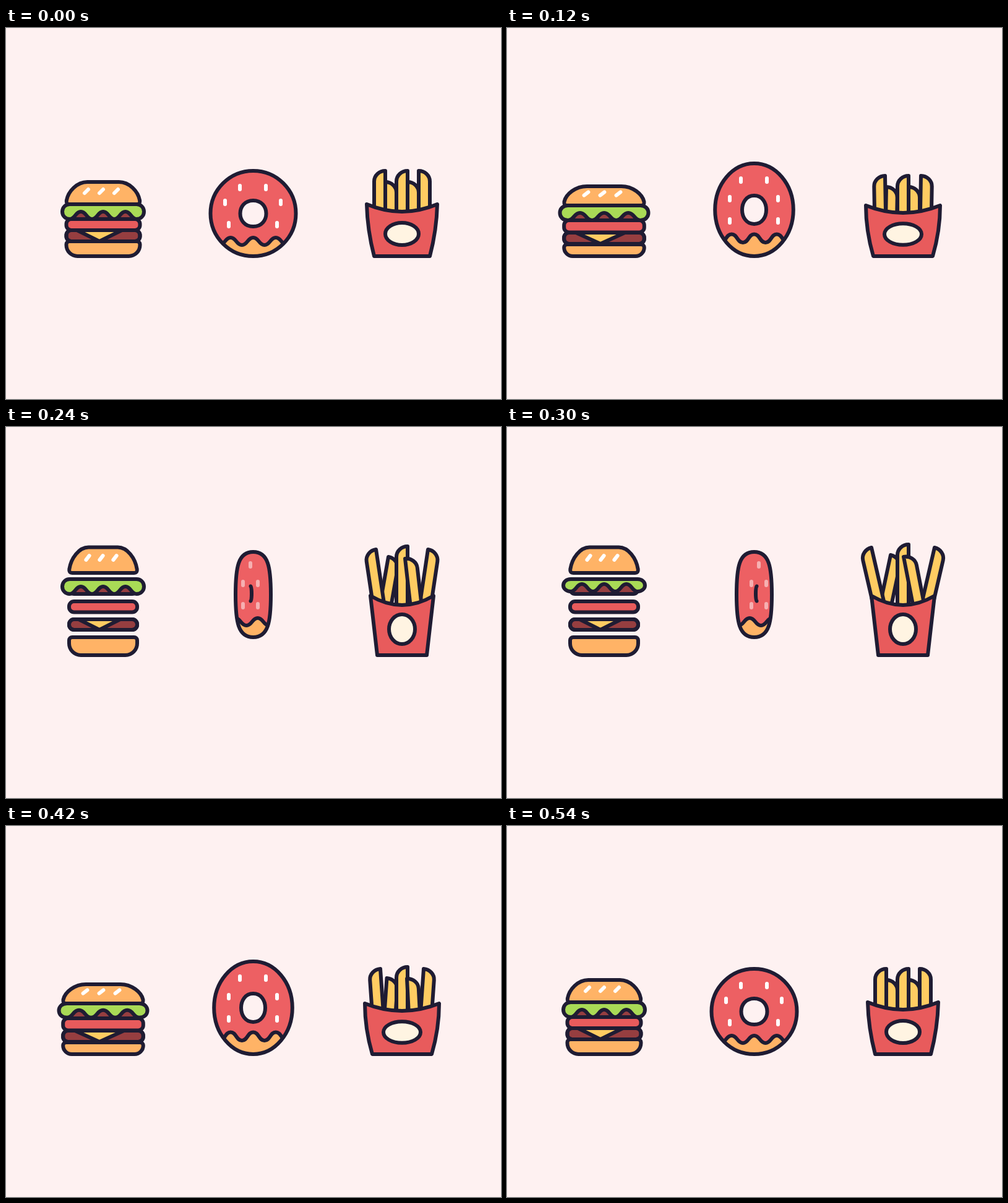
An HTML page with a canvas that plays this animation: 800 px wide and 600 px high, repeating every 720 ms.

```html
<!DOCTYPE html>
<html lang="en">
<head>
<meta charset="utf-8">
<title>Jumping snacks</title>
<style>
html, body { margin: 0; width: 100%; height: 100%; overflow: hidden; background: #fef1f1; }
canvas { display: block; }
</style>
</head>
<body>
<canvas id="stage" width="800" height="600"></canvas>
<script>
const ctx = document.getElementById('stage').getContext('2d');
const INK = '#1f1c33', BG = '#fef1f1', BUN = '#ffb366', GLAZE = '#ed6063', RED = '#e85b5c',
      GREEN = '#a9da56', MEAT = '#963e40', YELLOW = '#ffcc62', CREAM = '#fff4e2';
const LOOP = 720, STEP = 30, MOVE = 540;
const TIMES = [0, 120, 180, 240, 270, 300, 360, 420, 540];
let now = 0;

// Monotone cubic through the key poses; five values mean the way back mirrors the way up.
function at(values) {
  const v = values.length === 5 ? [...values, ...values.slice(0, 4).reverse()] : values;
  const last = TIMES.length - 1;
  const chord = i => (v[i + 1] - v[i]) / (TIMES[i + 1] - TIMES[i]);
  const slope = i => {
    if (i === 0 || i === last) return 0;
    const a = chord(i - 1), b = chord(i);
    return a * b > 0 ? 2 * a * b / (a + b) : 0;
  };
  let i = 0;
  while (i < last - 1 && now >= TIMES[i + 1]) i++;
  const span = TIMES[i + 1] - TIMES[i], s = (now - TIMES[i]) / span, r = 1 - s;
  return v[i] * (1 + 2 * s) * r * r + v[i + 1] * s * s * (3 - 2 * s)
       + span * s * r * (slope(i) * r - slope(i + 1) * s);
}

function paint(fill, path) {
  if (fill) { ctx.fillStyle = fill; ctx.fill(path); }
  ctx.strokeStyle = INK;
  ctx.stroke(path);
}

// Continues a path with smooth half waves, alternating between two heights.
function wave(path, x, half, count, first, second) {
  for (let i = 0; i < count; i++) {
    const from = i % 2 ? second : first, to = i % 2 ? first : second;
    path.bezierCurveTo(x + half / 2, from, x + half / 2, to, x + half, to);
    x += half;
  }
}

function slab(cx, w, top, bottom, radii) {
  const p = new Path2D();
  p.roundRect(cx - w, top, 2 * w, bottom - top, radii);
  return p;
}

function burger() {
  const cx = 157, w = at([59.5, 64.8, 59.5, 55, 53.5]);

  const baseTop = at([345, 350, 345, 340, 339]), round = at([18, 14, 18, 19, 19]);
  paint(BUN, slab(cx, w, baseTop, 369, [5, 5, round, round]));

  const meatTop = at([327, 331, 321, 311, 308]), meatBottom = at([345, 349, 339, 328, 325]);
  const meat = slab(cx, w, meatTop, meatBottom, 8);
  paint(MEAT, meat);
  ctx.save();
  ctx.clip(meat);
  const cheese = new Path2D();
  cheese.moveTo(cx - 6 - .61 * w, meatTop);
  cheese.lineTo(cx - 6, meatBottom);
  cheese.lineTo(cx - 6 + .61 * w, meatTop);
  paint(YELLOW, cheese);
  ctx.restore();
  paint(null, meat);

  paint(RED, slab(cx, w, at([309, 311, 297, 282, 278.5]), at([327, 330.5, 315, 299.5, 296]), 8));

  const leafTop = at([285, 287, 267, 246, 242]), under = at([309, 311, 291, 270, 266]);
  paint(MEAT, slab(cx, w, leafTop, under, 8));
  lettuce(cx, at([66, 71.5, 69, 66, 65]), leafTop, under - at([0, 0, 0, 0, 1, 4, 6.5, 1.2, 0]));

  topBun(cx, w, at([249, 256, 225, 194.5, 190]), at([285, 287, 261, 236, 231]));
  const gap = at([24, 26, 24, 22, 21.5]), y = at([264, 268, 240, 211.5, 207]);
  const dx = at([3, 3.4, 3, 2.6, 2.5]), dy = at([3, 2.6, 3, 3.4, 3.5]);
  ctx.strokeStyle = '#fff';
  for (const i of [-1, 0, 1]) {
    const x = 154 + i * gap;
    ctx.beginPath();
    ctx.moveTo(x - dx, y + dy);
    ctx.lineTo(x + dx, y - dy);
    ctx.stroke();
  }
}

function lettuce(cx, w, top, bottom) {
  const half = 18 * w / 66, start = cx - 3 * half, end = cx + 3 * half;
  const mid = (top + bottom) / 2, k = (bottom - top) * .276;
  const p = new Path2D();
  p.moveTo(end, top);
  p.lineTo(start, top);
  p.bezierCurveTo(cx - w + 5, top, cx - w, mid - k, cx - w, mid);
  p.bezierCurveTo(cx - w, mid + k, cx - w + 5, bottom, start, bottom);
  wave(p, start, half, 6, bottom, bottom - 12);
  p.bezierCurveTo(cx + w - 5, bottom, cx + w, mid + k, cx + w, mid);
  p.bezierCurveTo(cx + w, mid - k, cx + w - 5, top, end, top);
  p.closePath();
  paint(GREEN, p);
}

function topBun(cx, w, top, bottom) {
  const flat = .43 * w, low = bottom - 6, h = low - top;
  const p = new Path2D();
  p.moveTo(cx - w + 5, bottom);
  p.quadraticCurveTo(cx - w - .5, bottom, cx - w + .3, low);
  p.bezierCurveTo(cx - w + 3, low - .5 * h, cx - flat - .28 * w, top, cx - flat, top);
  p.lineTo(cx + flat, top);
  p.bezierCurveTo(cx + flat + .28 * w, top, cx + w - 3, low - .5 * h, cx + w - .3, low);
  p.quadraticCurveTo(cx + w + .5, bottom, cx + w - 5, bottom);
  p.closePath();
  paint(BUN, p);
}

function donut() {
  const cx = 399.5, cy = at([300, 294, 283.8, 271, 268]);
  const rx = at([69, 63.3, 43.5, 28.5, 27]), ry = at([69, 75, 70.5, 69, 68.5]);
  const hx = rx * at([.5523, .5523, .6, .85, .87]), hy = ry * at([.5523, .5523, .6, .65, .65]);
  const body = new Path2D();
  body.moveTo(cx, cy - ry);
  body.bezierCurveTo(cx + hx, cy - ry, cx + rx, cy - hy, cx + rx, cy);
  body.bezierCurveTo(cx + rx, cy + hy, cx + hx, cy + ry, cx, cy + ry);
  body.bezierCurveTo(cx - hx, cy + ry, cx - rx, cy + hy, cx - rx, cy);
  body.bezierCurveTo(cx - rx, cy - hy, cx - hx, cy - ry, cx, cy - ry);
  body.closePath();
  ctx.fillStyle = BUN;
  ctx.fill(body);

  ctx.save();
  ctx.clip(body);
  const half = 18.25, turn = Math.min(1, Math.max(0, (now - 120) / 300));
  const x = cx - half * (6 + 4 * turn);
  const crest = at([339, 333.5, 321, 309, 306]), dip = at([351, 347, 334, 321, 318]);
  const glaze = new Path2D();
  glaze.moveTo(x, 150);
  glaze.lineTo(x, crest);
  wave(glaze, x, half, 18, crest, dip);
  glaze.lineTo(x + 18 * half, 150);
  paint(GLAZE, glaze);
  ctx.restore();
  paint(null, body);

  sprinkles();
  hole();
}

function sprinkle(x, y, alpha) {
  ctx.globalAlpha = alpha;
  ctx.strokeStyle = '#fff';
  ctx.beginPath();
  ctx.moveTo(x, y - 3);
  ctx.lineTo(x, y + 3);
  ctx.stroke();
  ctx.globalAlpha = 1;
}

function sprinkles() {
  const mid = at([399, 399, 389, 395, 401, 407, 413, 399, 399]);
  const alpha = at([1, 1, 1, .5, .5]), top = at([258, 246, 236, 223, 220]);
  const row = at([282, 276, 266, 253, 250]);
  const wide = at([45, 39, 18, 12, 12]), narrow = at([39, 39, 18, 12, 12]);
  sprinkle(mid - at([21, 21, 8, 5, 3, 7, 19, 21, 21]), top, at([1, 1, .5, 0, 0]));
  sprinkle(mid + at([21, 21, 6, 0, 0]), top, alpha);
  for (const side of [-1, 1]) {
    sprinkle(mid + side * wide, row, alpha);
    sprinkle(mid + side * narrow, row + 36, alpha);
  }
}

// Two arcs sharing their ends; they fold onto each other as the ring turns edge-on.
function hole() {
  const x = at([399.5, 399.5, 388, 395.5, 399.5, 403.5, 411.5, 399.5, 399.5]);
  const y = at([300, 294, 283, 269.5, 267]), ry = at([21, 23, 23, 12, 11]);
  const right = x + 4 / 3 * at([21, 19.5, 9.5, 1.5, 0, -1.5, -9.5, 19.5, 21]);
  const left = x - 4 / 3 * at([21, 19.5, -9.5, -1.5, 0, 1.5, 9.5, 19.5, 21]);
  const p = new Path2D();
  p.moveTo(x, y - ry);
  p.bezierCurveTo(right, y - ry, right, y + ry, x, y + ry);
  p.bezierCurveTo(left, y + ry, left, y - ry, x, y - ry);
  paint(BG, p);
}

function fry(x, y, degrees, side) {
  const w = 18 * side, h = 17, length = 100, k = .45;
  const p = new Path2D();
  p.moveTo(0, length);
  p.lineTo(0, 0);
  p.bezierCurveTo(w * (1 - k), 0, w, h * k, w, h);
  p.lineTo(w, length);
  ctx.save();
  ctx.translate(x, y);
  ctx.rotate(degrees * Math.PI / 180);
  paint(YELLOW, p);
  ctx.restore();
}

function fries() {
  const cx = 640;
  const spread = at([27, 29, 36, 42, 47, 51, 43.3, 35, 27]);
  const outerY = at([231, 239, 219, 198, 193.5, 195, 219, 231, 231]);
  const tilt = at([0, 1, 4, 8.5, 11, 13, 9.5, 4, 0]);
  fry(at([613, 613, 615.5, 618, 619, 620, 617, 615.5, 613]),
      at([249, 257, 235, 210, 206, 207, 230, 246, 249]),
      at([0, 1, 6, 10, 11, 12, 9, 4, 0]), 1);
  fry(cx - spread, outerY, -tilt, -1);
  fry(cx + spread, outerY, tilt, 1);
  fry(649, at([231, 239, 216, 193, 189, 190, 213, 228, 231]), 0, -1);
  fry(at([649, 649, 647, 645, 643, 641, 643, 648, 649]),
      at([249, 257, 236, 213, 209, 210, 233, 247, 249]),
      -at([0, 0, 4, 6.5, 9, 11, 9.5, 3, 0]), 1);

  const top = at([285, 287, 273, 273, 273]), sag = at([297, 299, 288, 288, 288]);
  const wide = at([57, 60, 51, 51, 51]), base = at([45, 48, 40, 40, 40]);
  const bow = (wide + base) / 2 + at([5, 6, 0, 0, 0]), mid = (top + 369) / 2;
  const box = new Path2D();
  box.moveTo(cx - wide, top);
  box.quadraticCurveTo(cx, 2 * sag - top, cx + wide, top);
  box.quadraticCurveTo(cx + bow, mid, cx + base, 369);
  box.lineTo(cx - base, 369);
  box.quadraticCurveTo(cx - bow, mid, cx - wide, top);
  box.closePath();
  paint(RED, box);

  const label = new Path2D();
  label.ellipse(cx, at([333, 333.5, 327, 327, 327]), at([27, 30, 21, 21, 21]),
                at([18, 17.3, 24, 24, 24]), 0, 0, 2 * Math.PI);
  paint(CREAM, label);
}

function draw(time) {
  now = Math.min(MOVE, Math.floor((time % LOOP) / STEP) * STEP);
  ctx.fillStyle = BG;
  ctx.fillRect(0, 0, 800, 600);
  ctx.lineWidth = 6;
  ctx.lineCap = ctx.lineJoin = 'round';
  burger();
  donut();
  fries();
}

let start;
function frame(time) {
  start ??= time;
  draw(time - start);
  requestAnimationFrame(frame);
}
draw(0);
requestAnimationFrame(frame);
</script>
</body>
</html>
```
